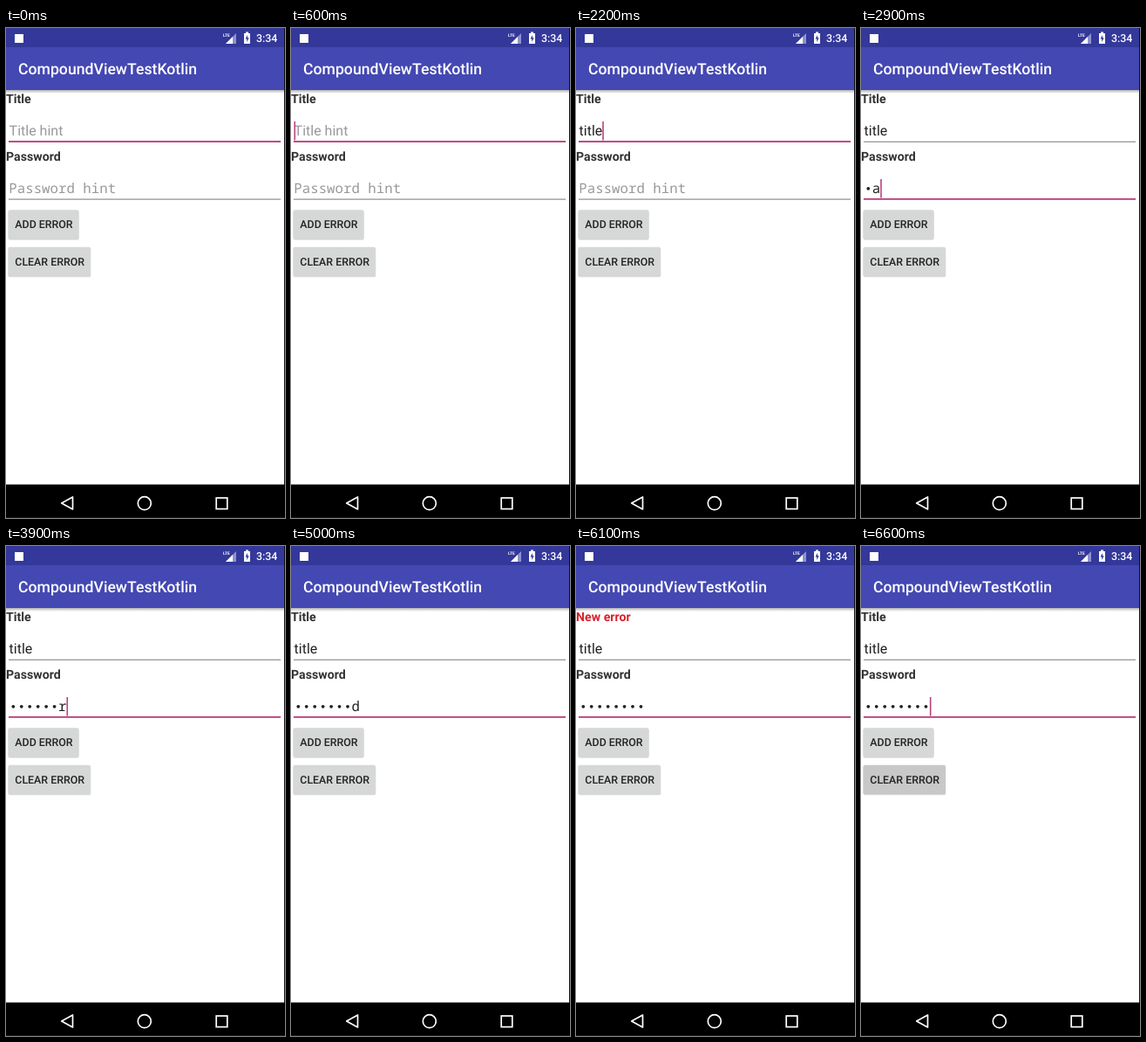
Write an HTML page that moves like this. It is 320 by 561 pixels and loops after 6700 ms.

```html
<!DOCTYPE html>
<html lang="en">
<head>
<meta charset="utf-8">
<style>
  html, body { margin: 0; width: 100%; height: 100%; overflow: hidden; background: #fff; }
  svg { display: block; width: 320px; height: 561px; font: 16px Roboto, sans-serif; text-rendering: geometricPrecision; }
  .mono { font: 15.75px "Noto Sans Mono", monospace; }
  .label { font-weight: 700; font-size: 14.2px; fill: #333; }
  .label.error { fill: #d8232f; }
  .button { font-weight: 500; font-size: 12.4px; fill: #222; }
  .nav { fill: none; stroke: #fff; stroke-width: 1.7; }
</style>
</head>
<body>
<svg viewBox="0 0 320 561">
  <defs>
    <linearGradient id="shade" x2="0" y2="1">
      <stop stop-color="#000" stop-opacity=".3"/>
      <stop offset="1" stop-color="#000" stop-opacity="0"/>
    </linearGradient>
  </defs>
  <rect width="320" height="561" fill="#fff"/>

  <!-- status bar and toolbar -->
  <rect width="320" height="22" fill="#33389a"/>
  <rect y="22" width="320" height="49" fill="#4448b2"/>
  <rect y="71" width="320" height="4" fill="url(#shade)"/>
  <rect x="10" y="7" width="10" height="10" fill="#fff"/>
  <path d="M264 6V18H252Z" fill="#8e92cb"/>
  <path d="M260 10V18H252Z" fill="#fff"/>
  <text x="249" y="10" font-size="4.8" font-weight="700" fill="#fff">LTE</text>
  <path d="M273 6H275V4.5H278V6H280V18H273Z" fill="#fff"/>
  <path d="M277 8L274.5 12.5H276.2V16L278.7 11.3H277Z" fill="#33389a"/>
  <text x="287" y="16" font-size="12.4" font-weight="500" fill="#fff">3:34</text>
  <text x="14" y="53" font-size="17.65" font-weight="500" fill="#fff">CompoundViewTestKotlin</text>

  <!-- form -->
  <text id="label" class="label" y="86"></text>
  <text class="label" y="152">Password</text>
  <text id="title" y="123"></text>
  <text id="secret" class="mono" y="189"></text>
  <g id="dots" fill="#222"></g>
  <rect id="titleLine" x="3" width="312"/>
  <rect id="secretLine" x="3" width="312"/>
  <rect id="caret" width="1.6" height="21.5" fill="#b8437f"/>

  <g fill="#000" fill-opacity=".15">
    <rect x="2.5" y="209.2" width="81.2" height="33.5" rx="2"/>
    <rect x="2.5" y="251.8" width="94.8" height="33.5" rx="2"/>
  </g>
  <rect id="add" x="2.5" y="208.2" width="81" height="33.5" rx="2"/>
  <rect id="clear" x="2.5" y="250.8" width="94.5" height="33.5" rx="2"/>
  <text class="button" x="10.3" y="229">ADD ERROR</text>
  <text class="button" x="10.3" y="272">CLEAR ERROR</text>

  <!-- navigation bar and edges -->
  <rect y="522.6" width="320" height="39"/>
  <path class="nav" stroke-linejoin="round" d="M63.7 544L76.5 537V551Z"/>
  <circle class="nav" cx="158.8" cy="544.2" r="7.5"/>
  <rect class="nav" x="241.2" y="538" width="12.6" height="12.6"/>
  <rect x="319" width="1" height="523" fill="#111"/>
  <rect y="560" width="320" height="1" fill="#032a08"/>
</svg>
<script>
const LOOP = 6700, LEFT = 3.6, CELL = 9.45, BLINK = 500, REVEAL = 1500;
const FOCUS_SECRET = 2500;
const titleTimes = [1600, 1700, 1900, 2000, 2200];
const secretTimes = [2700, 2900, 3100, 3300, 3500, 3700, 3900, 4400];
const press = { add: [5100, 5600], clear: [6200, LOOP] };
const errorSpan = [5300, 6300];

const el = id => document.getElementById(id);
const within = (t, [from, to]) => t >= from && t < to;
const typed = (times, t) => times.filter(s => s <= t).length;
const set = (node, attrs) => {
  for (const key in attrs) node.setAttribute(key, attrs[key]);
};

const dots = secretTimes.map((_, i) => {
  const dot = document.createElementNS("http://www.w3.org/2000/svg", "circle");
  set(dot, { cx: LEFT + CELL * (i + .5), cy: 183.8, r: 1.9 });
  return el("dots").appendChild(dot);
});

function field(node, text, hint, x) {
  node.textContent = text || hint;
  set(node, { x, fill: text ? "#222" : "#999" });
}

function underline(node, y, focused) {
  set(node, focused
    ? { y: y - 1.1, height: 1.9, fill: "#b8437f" }
    : { y: y - .5, height: 1.2, fill: "#8e8e8e" });
}

function draw(t) {
  const inSecret = t >= FOCUS_SECRET;
  const nTitle = typed(titleTimes, t), nSecret = typed(secretTimes, t);
  const error = within(t, errorSpan);

  el("label").textContent = error ? "New error" : "Title";
  el("label").classList.toggle("error", error);

  field(el("title"), "title".slice(0, nTitle), "Title hint", LEFT);
  const titleEnd = nTitle ? el("title").getComputedTextLength() : 0;

  // the last password letter stays readable for a moment
  const shown = nSecret > 0 && t - secretTimes[nSecret - 1] < REVEAL;
  const masked = nSecret - shown;
  const letter = shown ? "password"[masked] : "";
  field(el("secret"), letter, nSecret ? "" : "Password hint", LEFT - .3 + masked * CELL);
  dots.forEach((dot, i) => set(dot, { visibility: i < masked ? "visible" : "hidden" }));

  underline(el("titleLine"), 130.2, !inSecret);
  underline(el("secretLine"), 196, inSecret);

  // the caret restarts its blink at each key
  const since = [BLINK, FOCUS_SECRET, ...titleTimes, ...secretTimes].filter(s => s <= t);
  const age = t - Math.max(...since);
  set(el("caret"), {
    x: inSecret ? LEFT - .3 + nSecret * CELL : LEFT - .1 + titleEnd,
    y: inSecret ? 173 : 107,
    visibility: since.length && age % (2 * BLINK) < BLINK ? "visible" : "hidden"
  });

  for (const id in press)
    set(el(id), { fill: within(t, press[id]) ? "#c8c8c8" : "#d6d7d7" });
}

const start = performance.now();
function frame() {
  draw((performance.now() - start) % LOOP);
  requestAnimationFrame(frame);
}
frame();
</script>
</body>
</html>
```
